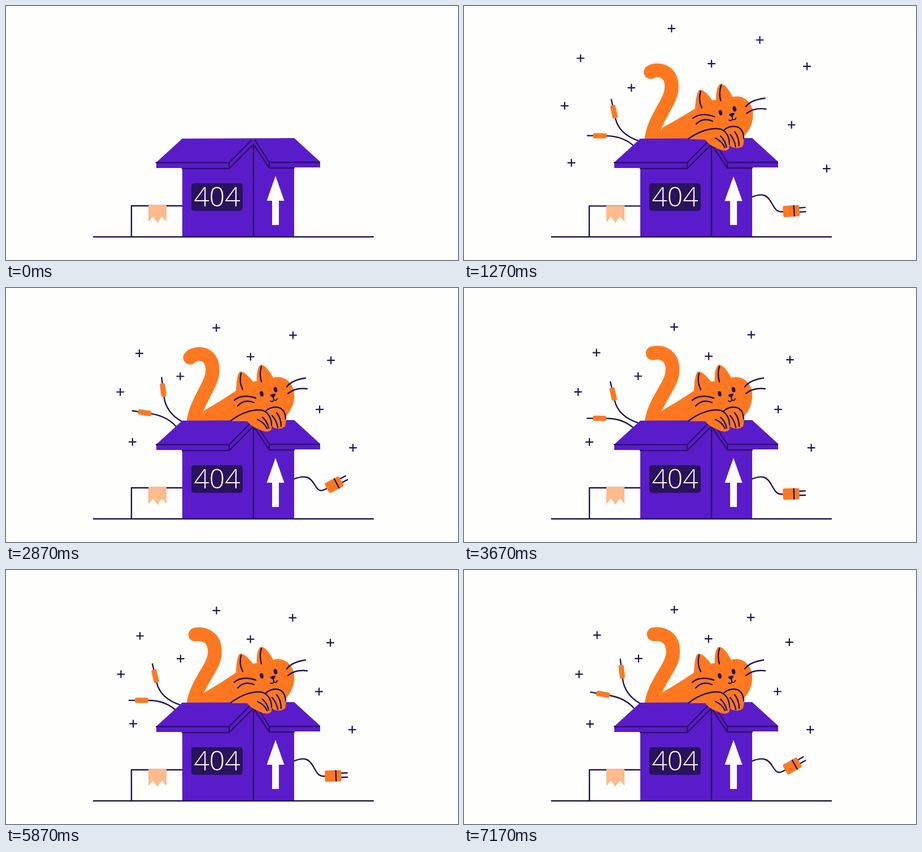
Recreate the animation shown at these times as an HTML page with a canvas. Size 800x450 px, loop 7.21 s.

```html
<!DOCTYPE html>
<html lang="en">
<head>
<meta charset="utf-8">
<title>404</title>
<style>
html, body { margin: 0; width: 100%; height: 100%; overflow: hidden; background: #fefefc; }
canvas { display: block; }
</style>
</head>
<body>
<canvas width="800" height="450"></canvas>
<script>
const c = document.querySelector('canvas').getContext('2d');
const LOOP = 7210;
const BG = '#fefefc', INK = '#201352', EDGE = '#2b1065', PURPLE = '#5a1cca', ORANGE = '#ff7820';
const rad = Math.PI / 180;

c.lineCap = c.lineJoin = 'round';

const fill = (d, color) => { c.fillStyle = color; c.fill(new Path2D(d)); };
const line = (d, width = 2.4, color = INK) => {
  c.lineWidth = width;
  c.strokeStyle = color;
  c.stroke(new Path2D(d));
};
const group = (x, y, turn, sx, sy, draw) => {
  c.save();
  c.translate(x, y);
  c.rotate(turn * rad);
  c.scale(sx, sy);
  draw();
  c.restore();
};
const clamp = v => Math.max(0, Math.min(1, v));
const smooth = v => (v = clamp(v), v * v * (3 - 2 * v));
const mix = (a, b, k) => a.map((v, i) => v + (b[i] - v) * k);

// Cables linger at the low end of their swing
const swing = t => (.5 - .5 * Math.cos((t - 3800) / 2200 * 2 * Math.PI)) ** 1.5;

// Eased value through [time, value] pairs
function key(t, ...keys) {
  let v = keys[0][1];
  for (let i = 1; i < keys.length; i++)
    v += (keys[i][1] - keys[i - 1][1]) * smooth((t - keys[i - 1][0]) / (keys[i][0] - keys[i - 1][0]));
  return v;
}

// x, y, delay
const stars = [
  [373, 75, 100], [505, 88, 6], [240, 119, 112], [571, 131, 116], [432, 125, 46],
  [311, 159, -28], [208, 186, -54], [551, 216, 46], [228, 272, 150], [608, 282, -32]
];

function drawStars(t) {
  for (const [x, y, delay] of stars) {
    const u = clamp((t - 326 - delay) / 550);
    const rise = 1.25 * (1 - (1 - u) ** 2);
    const drift = .018 * (1 - Math.cos((t - 1760 - delay) / 3200 * 2 * Math.PI));
    const back = smooth((t - 900 - delay) / 1000);
    const k = rise + (1 + drift - rise) * back;
    const r = 6 * Math.min(1, k);
    const sx = 400 + (x - 400) * k, sy = 245 + (y - 245) * k;
    line(`M${sx - r},${sy}h${2 * r}M${sx},${sy - r}v${2 * r}`, 2.2);
  }
}

// Pose: base x, base y, handle x, handle y, angle towards the tip
const wires = [
  { hidden: [345, 285, 345, 285, -124], low: [312, 248, 242, 210, -124], a: [308, 239, 264, 188, -103], b: [311, 236, 279.5, 180, -96.5] },
  { hidden: [345, 285, 335, 285, 135], low: [286, 262, 236, 289, 135], a: [299, 247, 240, 231, 180], b: [301, 245, 246, 220, 190] }
];

function drawWires(t) {
  const out = key(t, [360, 0], [630, 1]), settle = key(t, [630, 0], [1200, 1]);
  for (const w of wires) {
    const start = mix(w.hidden, w.low, out);
    const [bx, by, x, y, angle] = mix(start, mix(w.a, w.b, swing(t)), settle);
    const dx = Math.cos(angle * rad), dy = Math.sin(angle * rad);
    line(`M${bx},${by}Q${x - dx * 40},${y - dy * 40} ${x - dx * 12},${y - dy * 12}L${x + dx * 22},${y + dy * 22}`);
    group(x, y, angle, 1, 1, () => {
      c.fillStyle = ORANGE;
      c.beginPath();
      c.roundRect(-12, -4.7, 24, 9.4, 3);
      c.fill();
    });
  }
}

function drawPlug(t) {
  const start = mix([480, 350, 0], [577, 362, -20], key(t, [360, 0], [630, 1]));
  const [x, y, angle] = mix(start, mix([579, 365, -2], [581, 347, -30], swing(t)), key(t, [630, 0], [1200, 1]));
  const dx = Math.cos(angle * rad), dy = Math.sin(angle * rad);
  const ex = x - 14 * dx, ey = y - 14 * dy, d = ex - 506;
  line(`M506,340C${506 + d * .4},329 ${506 + d * .53},336 ${506 + d * .65},349S${ex - 11 * dx},${ey - 11 * dy} ${ex},${ey}`);
  group(x, y, angle, 1, 1, () => {
    line('M9,-4.5H25M9,3H25');
    c.fillStyle = ORANGE;
    c.beginPath();
    c.roundRect(-14.5, -10, 29, 20, 3);
    c.fill();
    line('M5,-9V9');
  });
}

function drawParcel(q) {
  group(268, 408, 0, 1 + .1 * q, 1 - .11 * q, () => {
    fill('M-46,-54H60V0H-46Z', BG);
    line('M60,-54H-46V0');
    fill('M-16,-55H16V-26L8,-35L0,-24L-8,-35L-16,-25Z', '#ffbb8c');
  });
}

function drawTail(t) {
  const w = -Math.cos((t - 4800) / 1700 * 2 * Math.PI) * clamp((t - 2000) / 400);
  const tail = `M${330.5 + 7 * w},${119 - 6.5 * w}C${341 + 11 * w},${113 - 1.5 * w} ${368 + 3.5 * w},${114 + 5 * w} ${367.5 + 3 * w},146` +
    `C${367.5 + 3 * w},174 333,202 331,246V380`;
  group(0, key(t, [720, 95], [1080, -6], [1400, 0]), 0, 1, 1, () => line(tail, 24.5, ORANGE));
}

function drawBody() {
  fill('M336,245L351,217C370,206 389,194 407,182C408,168 409,149 415,148C422,148 431,158 437,166L444,165' +
    'C443,152 446,136 452,136C460,137 468,150 473,159C490,154 504,164 509,180C514,204 502,221 494,229L492,330H350Z', ORANGE);
  line('M416,151Q412,166 419,180M452,139Q448,152 452,166');
  line('M497,175Q506,163 530,159.5M499,187Q512,176 533,178.5M404,199Q418,187 442,195M410,209Q422,196 439,203');
  c.fillStyle = INK;
  for (const [x, y] of [[452.5, 187.5], [477, 180]]) {
    c.beginPath();
    c.ellipse(x, y, 3.2, 4.8, -15 * rad, 0, 7);
    c.fill();
  }
  fill('M467,190Q471,187 477,187Q477,192 473,194Q469,193 467,190Z', INK);
  line('M473,193L474,198Q472,203 468,200M474,198Q478,201 480,196', 2);
}

function drawPaws() {
  fill('M398,236C415,222 438,213 455,218C466,222 471,235 470,250C466,257 455,255 445,249C436,246 430,240 427,236Z', ORANGE);
  fill('M459,220C466,211 480,208 488,213C496,220 497,236 494,245C488,251 475,250 471,245L468,231Z', ORANGE);
  line('M398,235C415,222 438,213 455,217C465,221 470,232 470,243M445,233Q457,238 462,249M454,229Q462,236 465,248');
  line('M459,219C466,211 478,209 486,213C492,217 495,223 495,232M471,226Q479,235 481,247M479,221Q487,231 487,245');
}

// First glimpse of the cat above the rim
function drawPeek(t) {
  group(0, key(t, [430, 48], [650, -1], [720, -10]), 0, 1, 1, () => {
    c.fillStyle = ORANGE;
    c.beginPath();
    c.ellipse(347, 228, 18, 10.5, -25 * rad, 0, 7);
    c.fill();
    fill('M388,216Q397,213 408,220L410,250H396Z', ORANGE);
    fill('M398,250V238C410,212 425,204 436,204C452,205 461,215 462,225L470,236V250Z', ORANGE);
    line('M391,217Q394,229 401,234C412,212 425,205 436,205C450,206 458,216 461,227');
    line('M433,212Q450,215 459,225M431,222Q448,224 457,233M455,211Q460,199 469,195M461,226Q469,212 482,210');
  });
}

function drawBox(q) {
  fill('M312,235L510,234L556,276V286H510V409H312V287H266V277Z', PURPLE);
  line('M266,277.5H395L434,238M395,278V287M312,288H395L438,245L466,287H510M441,238L466,277H555M466,277V287M438,245V408', 2.3, EDGE);
  c.fillStyle = '#28135c';
  c.beginPath();
  c.roundRect(328, 314, 91, 49, 5);
  c.fill();
  c.fillStyle = '#fff6f2';
  c.font = '300 48px "Open Sans", "Noto Sans", sans-serif';
  c.textAlign = 'center';
  c.fillText('404', 373.5, 355);
  group(477, 388, 0, 1 + .16 * q, 1 - .14 * q, () =>
    fill('M0,-87L15.5,-43H6V0H-6V-43H-15.5Z', '#fff'));
}

function draw(t) {
  c.fillStyle = BG;
  c.fillRect(0, 0, 800, 450);
  const squash = key(t, [330, 0], [630, 1], [880, -.6], [1120, .25], [1350, 0]);
  const lift = key(t, [720, 58], [1000, -12], [1350, 3], [1650, 0]);
  const tilt = key(t, [720, -8], [1000, 3], [1650, 0]);
  const cat = draw => group(440, 235 + lift, tilt, 1, 1, () => {
    c.translate(-440, -235);
    draw();
  });
  const risen = t > 720;

  drawStars(t);
  drawWires(t);
  drawPlug(t);
  drawParcel(squash);
  if (risen) {
    drawTail(t);
    cat(drawBody);
    if (lift > 14) cat(drawPaws);
  } else {
    drawPeek(t);
  }
  drawBox(squash);
  if (risen && lift <= 14) cat(drawPaws);
  line('M155,409H650');
}

const start = performance.now();
(function frame() {
  draw((performance.now() - start) % LOOP);
  requestAnimationFrame(frame);
})();
</script>
</body>
</html>
```
